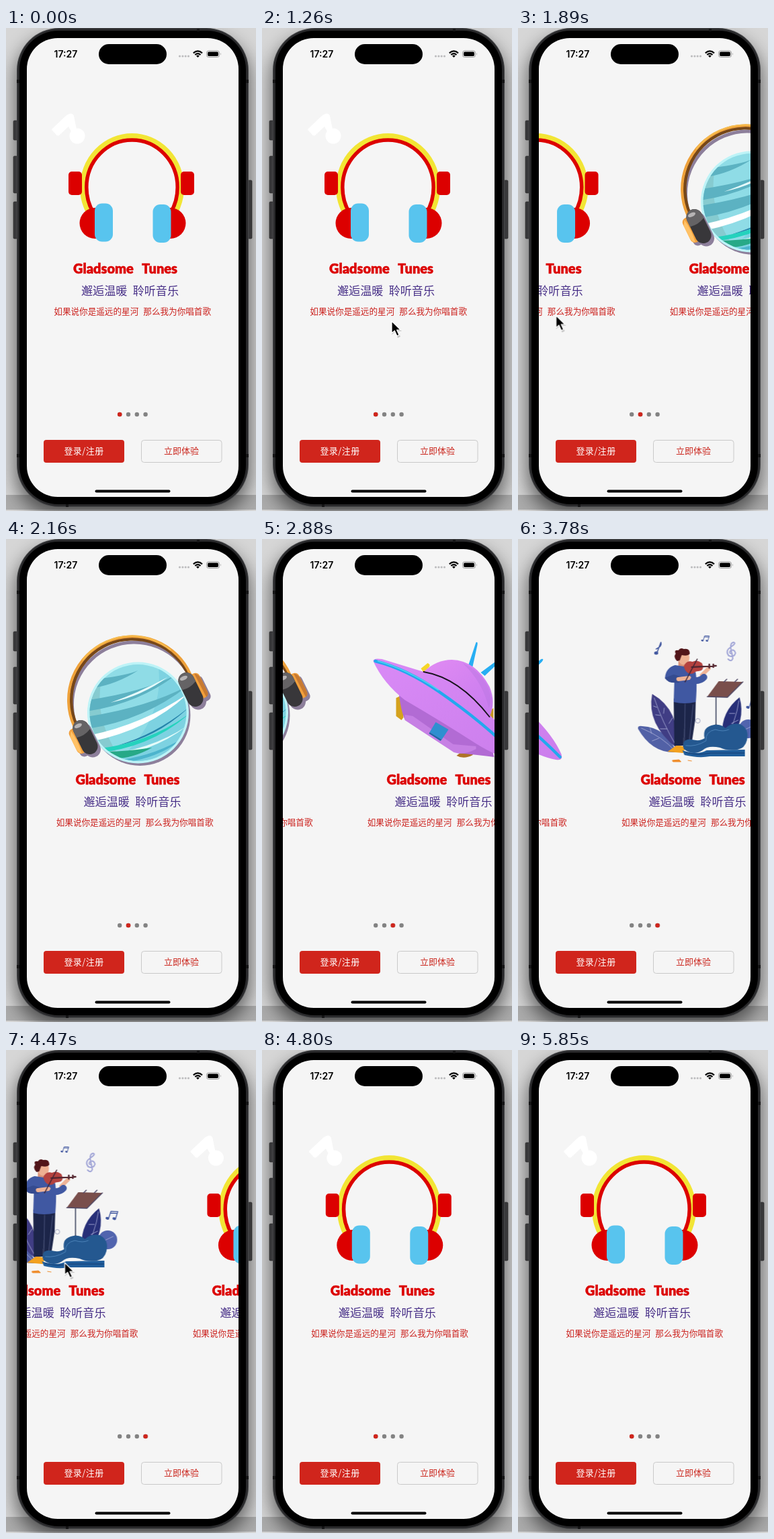
An HTML page that plays this animation: 372x720 px, repeating every 6330 ms.

```html
<!DOCTYPE html>
<html lang="zh-CN">
<head>
<meta charset="utf-8">
<title>Music onboarding</title>
<style>
  html, body { margin: 0; width: 100%; height: 100%; overflow: hidden; background: #d6d6d6; }
  svg { display: block; width: 372px; height: 720px; }
  text { font-family: "Noto Sans CJK SC", "Noto Sans CJK", "Noto Sans", sans-serif; }
  .clock { font: 600 14px Inter, sans-serif; }
  .brand { font: 900 20px Lato, sans-serif; fill: #dc0000; stroke: #dc0000; stroke-width: .5px; }
  .slogan { font-size: 17.1px; fill: #483088; }
  .lyric { font-size: 12.6px; fill: #cb211d; }
  .btn { font-size: 13px; text-anchor: middle; }
  .line { fill: none; stroke-linecap: round; stroke-linejoin: round; }

  #strip, #active, #cursor { animation: 6330ms linear infinite; }
  #strip { animation-name: swipe; }
  #active { animation-name: page; animation-timing-function: step-end; }
  #cursor { animation-name: pointer; }

  /* Each swipe: an accelerating drag of 110px, then an exponential settle. */
  @keyframes swipe {
    0% { transform: translateX(0); }
    27.62% { transform: translateX(0); animation-timing-function: cubic-bezier(.33, 0, .67, 0); }
    29.52% { transform: translateX(-110px); animation-timing-function: cubic-bezier(.16, 1, .3, 1); }
    37.73% { transform: translateX(-315px); }
    42.58% { transform: translateX(-315px); animation-timing-function: cubic-bezier(.33, 0, .67, 0); }
    44.47% { transform: translateX(-425px); animation-timing-function: cubic-bezier(.16, 1, .3, 1); }
    52.69% { transform: translateX(-630px); }
    56.75% { transform: translateX(-630px); animation-timing-function: cubic-bezier(.33, 0, .67, 0); }
    58.65% { transform: translateX(-740px); animation-timing-function: cubic-bezier(.16, 1, .3, 1); }
    66.86% { transform: translateX(-945px); }
    68.74% { transform: translateX(-945px); animation-timing-function: cubic-bezier(.33, 0, .67, 0); }
    70.64% { transform: translateX(-1055px); animation-timing-function: cubic-bezier(.16, 1, .3, 1); }
    78.85%, 100% { transform: translateX(-1260px); }
  }
  @keyframes page {
    0% { transform: translateX(0); }
    29.83% { transform: translateX(12.8px); }
    44.79% { transform: translateX(25.6px); }
    58.96% { transform: translateX(38.4px); }
    70.95%, 100% { transform: translateX(0); }
  }
  @keyframes pointer {
    0%, 16.58% { transform: translate(28px, 540px); visibility: hidden; }
    16.6% { transform: translate(28px, 540px); visibility: visible; }
    19.9%, 27.62% { transform: translate(193px, 437px); animation-timing-function: cubic-bezier(.33, 0, .67, 0); }
    29.52% { transform: translate(83px, 430px); }
    30.9%, 37.9% { transform: translate(-20px, 425px); }
    41%, 42.58% { transform: translate(190px, 390px); animation-timing-function: cubic-bezier(.33, 0, .67, 0); }
    44.2% { transform: translate(80px, 382px); }
    45.2%, 54.9% { transform: translate(-20px, 376px); }
    56.4%, 56.75% { transform: translate(190px, 350px); animation-timing-function: cubic-bezier(.33, 0, .67, 0); }
    58.5% { transform: translate(80px, 344px); }
    59.4%, 63.5% { transform: translate(-20px, 340px); }
    66.4%, 68.74% { transform: translate(196px, 324px); animation-timing-function: cubic-bezier(.33, 0, .67, 0); }
    70.64% { transform: translate(86px, 317px); animation-timing-function: ease-out; }
    72.8%, 74% { transform: translate(38px, 314px); visibility: visible; }
    74.02%, 100% { transform: translate(38px, 314px); visibility: hidden; }
  }
</style>
</head>
<body>
<svg viewBox="0 0 372 720" xmlns="http://www.w3.org/2000/svg">
  <defs>
    <filter id="soft" x="-20%" y="-20%" width="140%" height="140%"><feGaussianBlur stdDeviation="14"/></filter>
    <clipPath id="screen"><rect x="31" y="15" width="315" height="684" rx="46"/></clipPath>
    <clipPath id="arch"><rect x="90" y="140" width="200" height="134"/></clipPath>
    <clipPath id="globe"><circle cx="196" cy="259" r="72"/></clipPath>
    <linearGradient id="hull" x1="0" y1="0" x2="1" y2="1">
      <stop offset="0" stop-color="#d98af6"/><stop offset="1" stop-color="#cb7eec"/>
    </linearGradient>
    <linearGradient id="dome" x1="0" y1="0" x2="1" y2="1">
      <stop offset="0" stop-color="#e18bf3"/><stop offset="1" stop-color="#c77bee"/>
    </linearGradient>

    <g id="words">
      <text class="brand" x="100" y="366">Gladsome</text>
      <text class="brand" x="202" y="366">Tunes</text>
      <text class="slogan" x="112" y="398">邂逅温暖</text>
      <text class="slogan" x="188.7" y="398">聆听音乐</text>
      <text class="lyric" x="71.3" y="426.5">如果说你是遥远的星河</text>
      <text class="lyric" x="204.3" y="426.5">那么我为你唱首歌</text>
    </g>

    <g id="notes">
      <path class="line" d="M3 16V3L14 0V13M3 6L14 3" stroke="currentColor" stroke-width="1.5"/>
      <ellipse cx="1" cy="16" rx="3" ry="2.2" fill="currentColor"/>
      <ellipse cx="12" cy="13" rx="3" ry="2.2" fill="currentColor"/>
    </g>

    <g id="cup">
      <rect x="-12" y="-27" width="24" height="54" rx="12" fill="#38373a"/>
      <path d="M-12 -5V-15A12 12 0 0 1 12 -15V-8Q0 -2 -12 -5Z" fill="#656365"/>
      <ellipse cx="-2" cy="-20" rx="6" ry="3" fill="#b6b3b4"/>
    </g>

    <g id="phones">
      <path d="M70 149L89 131Q98 124 101 131L105 151L97 154L93 147L79 160Q76 162 73 157L69 153Q67 151 70 149Z" fill="#fff"/>
      <circle cx="106" cy="161" r="11.5" fill="#fff"/>
      <g clip-path="url(#arch)" fill="none">
        <ellipse cx="187.5" cy="237.5" rx="73.5" ry="76.5" stroke="#f2e535" stroke-width="8"/>
        <ellipse cx="187.5" cy="237.5" rx="67.7" ry="70.5" stroke="#dc0000" stroke-width="5.5"/>
      </g>
      <g fill="#dc0000">
        <rect x="93" y="214" width="20" height="35" rx="5"/>
        <rect x="260" y="214" width="20" height="35" rx="5"/>
        <circle cx="132.5" cy="291" r="23"/>
        <circle cx="244.5" cy="291" r="23"/>
      </g>
      <g fill="#58c4ee">
        <rect x="132" y="261.5" width="27" height="57" rx="11"/>
        <rect x="218.5" y="263" width="27" height="57" rx="11"/>
      </g>
      <use href="#words"/>
    </g>

    <g id="planet">
      <g transform="translate(-3)">
        <circle cx="199" cy="263" r="75" fill="#8d7f9b"/>
        <path class="line" d="M105 282A90 90 0 0 1 276 211" stroke="#8d7f9b" stroke-width="5"/>
        <circle cx="196" cy="259" r="75.5" fill="#bdf3f7"/>
        <g clip-path="url(#globe)">
          <rect x="120" y="183" width="152" height="152" fill="#8fdce6"/>
          <path d="M120 183H150Q122 250 165 320L120 335Z" fill="#86cbd0"/>
          <path d="M225 180Q240 270 160 335H272V183Z" fill="#7dd2e1"/>
          <g fill="#5cb2c2">
            <path d="M130 222Q165 216 196 196Q180 203 140 208Z"/>
            <path d="M119 257Q195 246 252 203Q200 229 121 240Z"/>
            <path d="M120 283Q205 270 270 219Q210 251 119 265Z"/>
          </g>
          <path d="M155 244Q202 234 240 206Q195 230 155 244Z" fill="#e6fbfb"/>
          <path d="M126 302Q215 284 272 229Q205 276 122 293Z" fill="#fff"/>
          <path d="M165 308Q225 296 274 249Q225 290 165 308Z" fill="#2584ab"/>
          <path d="M133 319Q215 312 274 259Q215 304 133 313Z" fill="#25d2bd"/>
          <path d="M140 326Q215 321 270 278Q215 315 140 322Z" fill="#e4fcfa"/>
          <path d="M138 317Q170 318 217 311Q185 329 155 327Z" fill="#27a987"/>
          <path d="M172 334Q230 326 264 296Q225 321 172 329Z" fill="#4db4cd"/>
        </g>
        <g class="line">
          <path d="M104 277A89 89 0 0 1 272 204" stroke="#764719" stroke-width="5"/>
          <path d="M100.5 278A91.5 91.5 0 0 1 274 202" stroke="#eea13a" stroke-width="4"/>
          <path d="M114 180A91.5 91.5 0 0 1 244 165" stroke="#f7bd4e" stroke-width="2"/>
        </g>
        <g transform="translate(274.5 224.5) rotate(-26)">
          <g fill="#8d7f9b" transform="translate(2 6)">
            <rect x="-12" y="-27" width="24" height="54" rx="12"/>
            <rect x="2" y="-20" width="19" height="40" rx="7"/>
          </g>
          <rect x="2" y="-20" width="19" height="40" rx="7" fill="#f2a03c"/>
          <path d="M15 -19Q22 -17 21 0V13Q21 19 16 20Z" fill="#c77a32"/>
          <use href="#cup"/>
        </g>
        <g transform="translate(117.5 295.5) rotate(-26)">
          <g fill="#8d7f9b" transform="translate(2 6)">
            <rect x="-12" y="-27" width="24" height="54" rx="12"/>
            <rect x="-20" y="-20" width="19" height="40" rx="7"/>
          </g>
          <rect x="-20" y="-20" width="19" height="40" rx="7" fill="#f2a03c"/>
          <path d="M-15 -18Q-12 0 -15 19Q-19 18 -20 10V-10Z" fill="#ffc267"/>
          <use href="#cup"/>
        </g>
      </g>
      <use href="#words"/>
    </g>

    <g id="saucer">
      <g transform="translate(-85)">
        <path d="M306 190L318 154Q321 153 320 158L313 190ZM325 199L352 179Q357 178 353 183L331 204Z" fill="#27aef3"/>
        <path d="M236 193L246 185Q251 187 248 191L240 199Z" fill="#f5d628"/>
        <path d="M338 256L344 252V268L337 269Z" fill="#c79824"/>
        <path d="M199 237L207 233L210 266L207 270L199 264Z" fill="#d5a21e"/>
        <path d="M289 323Q300 313 316 313L313 322Q300 329 289 323Z" fill="#ae7328"/>
        <path d="M203 228Q206 256 212 269L290 319Q322 322 345 325L330 270Z" fill="#b26bd4"/>
        <path d="M212 262L224 264L284 306L318 309V313Q300 323 285 318L212 270Z" fill="#c680e4"/>
        <path d="M165 182Q165 177 178 179L240 198Q293 207 338 262Q370 293 382 321Q385 331 374 329Q350 325 318 305Q270 274 212 240Q180 215 165 182Z" fill="url(#hull)"/>
        <path d="M240 198Q259 180 282 180Q317 181 338 220Q348 244 338 265Q293 207 240 198Z" fill="url(#dome)"/>
        <path d="M298 185Q326 197 337 224Q343 240 337 252Q328 213 298 185Z" fill="#b976df" opacity=".45"/>
        <path class="line" d="M240 198Q293 207 338 265" stroke="#17121c" stroke-width="1.8"/>
        <path class="line" d="M168 182Q215 194 262 227Q330 274 380 325" stroke="#22a9ee" stroke-width="4.5"/>
        <path class="line" d="M172 182Q215 194 262 225" stroke="#4fd5f2" stroke-width="1.5"/>
        <path d="M258 273L277 284L267 299L249 288Z" fill="#2f8fd0"/>
        <path d="M249 288L267 299L265 301L248 290Z" fill="#1d69a4"/>
      </g>
      <use href="#words"/>
    </g>

    <g id="player">
      <g transform="translate(-82)">
        <g color="#4258a0">
          <use href="#notes" transform="translate(276 142) rotate(18) scale(.6)"/>
          <use href="#notes" transform="translate(345 237) rotate(18) scale(.9)"/>
          <path class="line" d="M206 170L212 154Q214 160 205 164" stroke="currentColor" stroke-width="1.6"/>
          <ellipse cx="205" cy="170" rx="3" ry="2.5" fill="currentColor"/>
        </g>
        <path class="line" d="M318 171Q313 171 315 167Q321 163 323 170Q321 177 313 174Q307 167 316 161Q325 155 320 154Q315 155 316 163L319 178Q317 184 312 179" stroke="#a3a7d7" stroke-width="2"/>

        <path d="M235 318Q199 320 178 283Q177 278 184 279Q221 281 235 318Z" fill="#5261a6"/>
        <path d="M236 312Q190 276 199 231Q241 255 236 312Z" fill="#403d84"/>
        <path d="M303 292Q302 257 329 236Q339 270 313 304Z" fill="#272f78"/>
        <circle cx="342" cy="283" r="14" fill="#5164ae"/>
        <g class="line" stroke="#aeb2da" stroke-width=".8">
          <path d="M183 282Q215 295 233 316M202 237Q214 273 235 309M328 241Q324 273 307 298M335 285L350 278"/>
          <path d="M206 251L201 249M211 263L204 262M216 260L217 252M221 283L211 283M224 275L229 267M198 290L196 282M209 297L199 301M322 260L314 260M317 275L327 270"/>
        </g>

        <path class="line" d="M294 235V290M294 276L286 291M294 276L302 290" stroke="#4c536b" stroke-width="1.7"/>
        <path d="M281 235L298 212L334 213L311 236Z" fill="#794e4b"/>
        <path class="line" d="M281 235L311 236L334 213M306 213L310 209M322 213L326 209" stroke="#4f4966" stroke-width="1.5"/>

        <path d="M222 317L236 307L249 310L245 319Z" fill="#f3a11f"/>
        <path d="M229 330L239 329L242 332H230ZM252 330L258 331" fill="#ef8c2b" stroke="#ef8c2b"/>
        <path d="M231 238H264L263 270L257 310H245L248 269L245 308H232Z" fill="#1c2549"/>
        <path class="line" d="M248 246L247 302M260 247L254 302" stroke="#5c6691" stroke-width=".7"/>

        <path d="M238 177H251V192H238Z" fill="#d99278"/>
        <path d="M233 188Q249 190 262 193Q267 205 264 243Q247 247 231 243L232 213L218 208Q219 192 233 188Z" fill="#4058a2"/>
        <path d="M218 207Q222 216 239 214L242 205L231 202Z" fill="#354b90"/>
        <path class="line" d="M238 209L254 207M273 203L283 193" stroke="#eeb397" stroke-width="6"/>
        <path class="line" d="M260 211Q271 212 276 206" stroke="#4058a2" stroke-width="10"/>
        <ellipse cx="246" cy="177" rx="8.5" ry="10.5" fill="#edb092"/>
        <path d="M236 182Q230 176 234 171Q231 165 238 166Q241 161 246 164Q255 162 255 171Q252 175 243 173L240 181Z" fill="#511519"/>
        <path d="M246 190Q250 180 259 183Q266 179 273 185Q278 196 268 197Q263 197 261 200Q250 204 246 190Z" fill="#b4423f"/>
        <path class="line" d="M258 191L294 189M284 187V192M290 187V191" stroke="#552831" stroke-width="2.5"/>
        <path class="line" d="M248 213L266 179" stroke="#3e2433" stroke-width="1.5"/>

        <path d="M246 313Q242 297 258 299Q270 302 277 297Q273 280 291 277Q302 276 308 282Q317 273 330 276Q344 283 340 300Q337 312 326 314Q310 316 300 311Q282 307 274 315Q260 324 246 313Z" fill="#245890"/>
        <path class="line" d="M249 308Q264 310 279 301Q278 287 293 284Q305 288 313 284" stroke="#4c83b9" stroke-width="1"/>
        <path d="M244 315Q266 323 280 315L337 314V324H285Q268 327 247 322Z" fill="#1f5d9b"/>
        <path class="line" d="M249 318Q266 323 286 319H336" stroke="#163f75" stroke-width="1.2"/>
        <circle cx="267" cy="271" r="3.4" fill="none" stroke="#8b91b4" stroke-width=".8"/>
      </g>
      <use href="#words"/>
    </g>
  </defs>

  <!-- Desktop and device -->
  <rect width="372" height="720" fill="#d6d6d6"/>
  <rect x="14" y="14" width="349" height="712" rx="62" opacity=".55" filter="url(#soft)"/>
  <rect y="696" width="372" height="22" opacity=".2"/>
  <g fill="#39393b" stroke="#222" stroke-width=".6">
    <rect x="11" y="138" width="7" height="29" rx="1.5"/>
    <rect x="11" y="191" width="7" height="55" rx="1.5"/>
    <rect x="11" y="259" width="7" height="55" rx="1.5"/>
    <rect x="360" y="227" width="6" height="87" rx="1.5"/>
  </g>
  <rect x="16" y="0" width="345" height="714" rx="63" fill="#47484a"/>
  <rect x="17" y="1" width="343" height="712" rx="62" fill="#29292b"/>
  <rect x="20" y="4" width="337" height="706" rx="58"/>
  <path d="M16 77h4v5h-4zM357 77h4v5h-4zM16 635h4v5h-4zM357 635h4v5h-4zM284 1h4v4h-4zM89 710h4v4h-4z" fill="#151516"/>
  <rect x="31" y="15" width="315" height="684" rx="46" fill="#f5f5f5"/>

  <g clip-path="url(#screen)">
    <g id="strip">
      <use href="#phones"/>
      <use href="#planet" x="315"/>
      <use href="#saucer" x="630"/>
      <use href="#player" x="945"/>
      <use href="#phones" x="1260"/>
    </g>
  </g>

  <!-- Status bar -->
  <rect x="138" y="24" width="101" height="30" rx="15"/>
  <text class="clock" x="71.5" y="44">17:27</text>
  <g fill="#bcbcbe">
    <circle cx="258.5" cy="42" r="1.6"/><circle cx="262.9" cy="42" r="1.6"/>
    <circle cx="267.2" cy="42" r="1.6"/><circle cx="271.5" cy="42" r="1.6"/>
  </g>
  <path d="M278.8 37.4Q285.4 31.4 292 37.4M281.3 40Q285.4 36.3 289.5 40" fill="none" stroke="#000" stroke-width="2.1"/>
  <path d="M283 41.5Q285.4 39.5 287.8 41.5L285.4 44Z"/>
  <rect x="298.5" y="34" width="19" height="9.5" rx="3" fill="none" stroke="#999"/>
  <rect x="300" y="35.5" width="16" height="6.5" rx="1.8"/>
  <path d="M319 37Q320.6 38.7 319 40.5Z" fill="#999"/>

  <!-- Pager and buttons -->
  <g fill="#838383">
    <circle cx="169.2" cy="576" r="3.2"/><circle cx="182" cy="576" r="3.2"/>
    <circle cx="194.8" cy="576" r="3.2"/><circle cx="207.6" cy="576" r="3.2"/>
  </g>
  <circle id="active" cx="169.2" cy="576" r="3.3" fill="#d0251c"/>
  <rect x="56" y="614" width="120" height="34" rx="4" fill="#d0251c"/>
  <text class="btn" x="116" y="635.3" fill="#fff" letter-spacing=".4">登录/注册</text>
  <rect x="201.5" y="614.5" width="119.5" height="33" rx="4" fill="none" stroke="#c9c9c9"/>
  <text class="btn" x="261" y="635.3" fill="#cb281f">立即体验</text>
  <rect x="132.5" y="688.5" width="112" height="4" rx="2"/>

  <g id="cursor">
    <path d="M0 2V20L5 16L9 25L13 23L9 15H15Z" opacity=".2"/>
    <path d="M0 0V18L4.3 14.2L7.8 22L11 20.6L7.6 13H13.2Z" stroke="#fff" stroke-width="1.2" stroke-linejoin="round"/>
  </g>
</svg>
</body>
</html>
```
